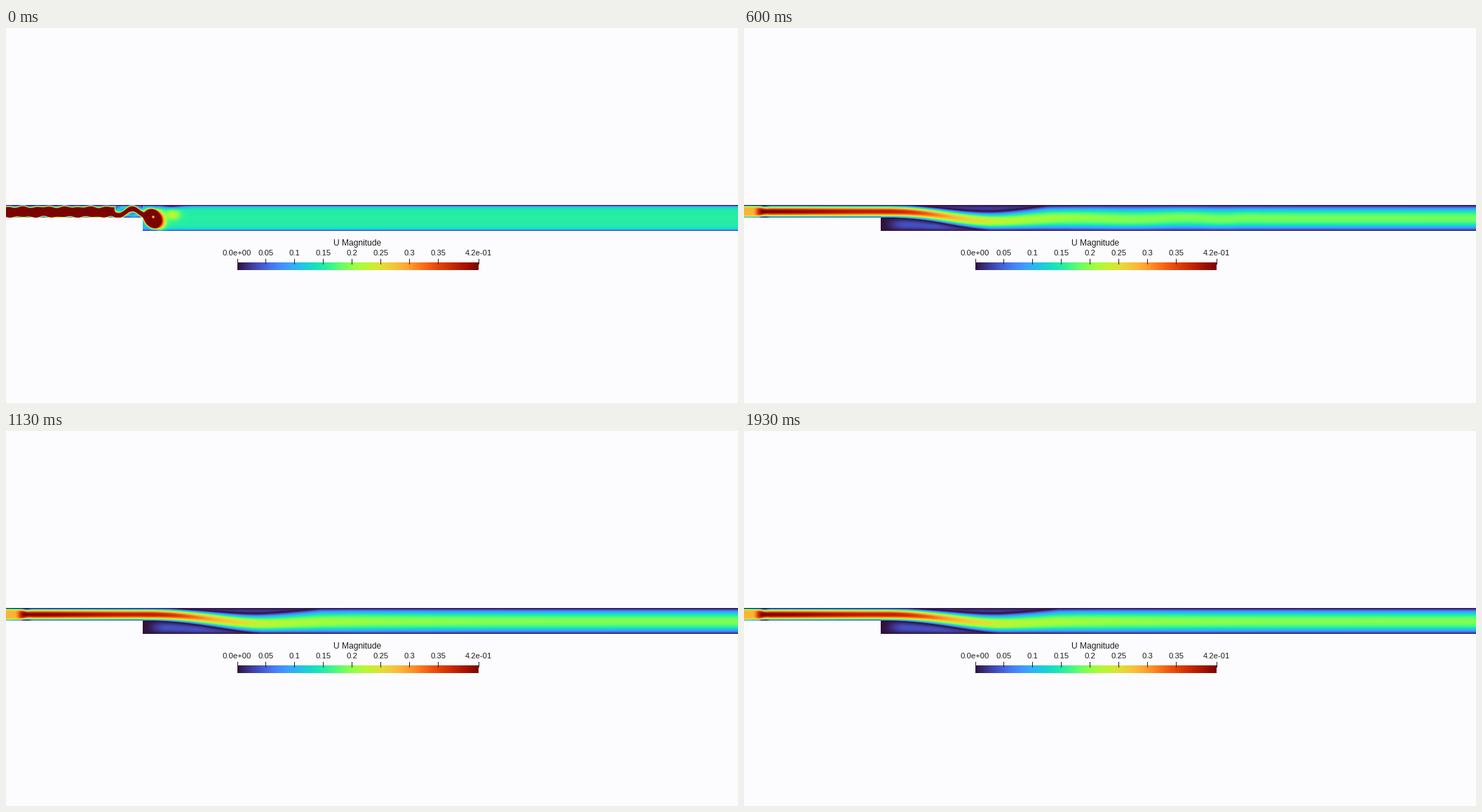
These frames come from a looping animation (1044x536 px, 2000 ms). A matplotlib script:

```python
import numpy as np
import matplotlib.pyplot as plt
from matplotlib.animation import FuncAnimation

W, H = 1044, 536
TOP, BOTTOM, STEP_X, STEP_Y = 253.6, 289.9, 195, 271
STEPS, TICK_MS, LOOP_MS = 30, 10, 2000
UMAX = 0.42

x = np.arange(W) + 0.5
X = x[None, :]
Y = (np.arange(253, 290) + 0.5)[:, None]


def ramp(v, a, b):
    t = np.clip((v - a) / (b - a), 0, 1)
    return t * t * (3 - 2 * t)


def bump(v, mid, width):
    return np.exp(-((v - mid) / width) ** 2)


def paint(v, dist, soft):
    """Saturate the field where dist is negative, with a soft rim."""
    return v + (0.5 - v) / (1 + np.exp(np.clip(dist / soft, -50, 50)))


def centreline(k, front):
    """Settled dip behind the step plus a wave train that drifts off and decays."""
    settled = 262.3 + 9.7 * ramp(x, 205, 370) + 3.2 * bump(x, 370, 75)
    s = front - x
    phase = np.pi * np.log1p(np.maximum(s, 0) / 100) / 0.28
    amp = 11.5 / (1 + (k / 6.2) ** 5) * ramp(s, -10, 110) * ramp(x, 215, 310)
    return np.clip(settled + amp * np.cos(phase), 262, 281)


def flow(k):
    """Speed field once the inlet jet has formed."""
    front = 242 + 57.5 * k
    past = np.maximum(x - STEP_X, 0)

    inlet = 0.285 + 0.135 * ramp(x, 12, 27) - 0.035 * ramp(x, 30, STEP_X)
    far = 0.192 - 0.042 * np.exp(-k / 5)
    peak = far + (inlet - far) / (1 + (past / 105) ** 2.4)
    peak += 0.25 * np.exp(-k / 1.2) * bump(x, front - 35, 35)

    half = 8.9 + 12 * (past / 275) ** 1.5 - bump(x, 29, 7)
    half += 30 * ramp(x, front - 30, front + 10)
    plug = 2 + 14 * np.exp(-k / 1.6) * ramp(x, front - 60, front)
    plug += 5 * (1 - ramp(x, 2, 34))
    shear = 1 + 0.4 * ramp(x, 195, 270) * (1 - ramp(x, 340, 520))

    mid = centreline(k, front)
    floor = np.where(x < STEP_X, STEP_Y, BOTTOM)
    up = np.minimum(half, mid - TOP)
    down = np.minimum(half, floor - mid)
    eta = np.abs(Y - mid) / np.where(Y < mid, up, down)
    jet = peak * (1 - np.minimum(eta, 1) ** plug) ** shear

    # Slow backflow in the pockets between jet and wall
    low, high = mid + down, mid - up
    gap_low, gap_high = floor - low, high - TOP
    s_low = np.clip((Y - low) / np.maximum(gap_low, 0.1), 0, 1)
    s_high = np.clip((high - Y) / np.maximum(gap_high, 0.1), 0, 1)
    back = 0.038 * np.clip(gap_low / 12, 0, 1) * ramp(x, 195, 230) * np.sin(np.pi * s_low)
    back += 0.03 * np.clip(gap_high / 10, 0, 1) * np.sin(np.pi * s_high)
    return jet + back


def start_up():
    """Speed field at the first instant: saturated eddies in the inlet."""
    floor = np.where(X < STEP_X, STEP_Y, BOTTOM)
    wall = np.clip(np.minimum(Y - TOP, floor - Y), 0, None)
    v = 0.151 + 0.08 * bump(X, 238, 10) * bump(Y, 267, 7)
    v = v * (1 - 0.95 * bump(X, 236, 17) * bump(Y, 253.5, 3.5))
    v = np.where((X < 205) & (Y > STEP_Y), 0.11, v)
    v = np.where(X < STEP_X, 0.12 + 0.07 * np.sin(X / 4.3) * np.sin(Y / 2 + X / 9), v)
    v *= 1 - np.exp(-wall / 1.8)

    # Scalloped slug, its wavy tail and the rolled-up head
    slug = np.abs(Y - 263 - 0.7 * np.sin(X / 5)) - 7.2 - 0.8 * np.sin(X / 3.1)
    v = paint(v, np.maximum(slug, X - 155), 0.6)
    tail = 0.8 * np.abs(Y - 263.3 - 4.9 * np.cos(np.pi * (X - 160) / 20)) - 3.2
    v = paint(v, np.maximum(tail, np.abs(X - 175) - 27), 0.6)
    along = (X - 210 + Y - 272.5) / np.sqrt(2)
    across = (X - 210 - Y + 272.5) / np.sqrt(2)
    head = 13 * (np.hypot(along / 15.5, across / 12.5) - 1)
    v = paint(v, head, 0.7 + 1.5 * ramp(X, 212, 224))
    return v - 0.32 * bump(np.hypot(X - 210, Y - 270), 0, 2)


def field(k):
    v = flow(k) if k else start_up()
    return np.where((X < STEP_X) & (Y > STEP_Y), np.nan, v)


fields = [field(k) for k in range(STEPS)]

fig = plt.figure(figsize=(W / 100, H / 100), dpi=100, facecolor="#fcfcfe")
ax = fig.add_axes([0, 0, 1, 1])
ax.axis("off")

look = dict(cmap="turbo", vmin=0, vmax=UMAX, aspect="auto", interpolation="nearest")
duct = ax.imshow(fields[0], extent=(0, W, 290, 253), **look)
ax.imshow(np.linspace(0, UMAX, 256)[None, :], extent=(330, 674, 346, 335), **look)
ax.set_xlim(0, W)
ax.set_ylim(H, 0)


def label(cx, cy, text, px):
    ax.text(cx, cy, text, fontsize=px * 0.72, family="Liberation Sans",
            color="#1c1c1c", ha="center", va="baseline")


label(501, 311, "U Magnitude", 12)
for value in [*np.arange(8) * 0.05, UMAX]:
    tx = 329.5 + 344 * value / UMAX
    text = f"{value:.1e}" if value in (0, UMAX) else f"{value:.2g}"
    label(tx, 325, text, 11.3)
    ax.plot([tx, tx], [330, 337], color="#222222", lw=0.72)


def update(i):
    k = int((i * TICK_MS + 3.4) * STEPS / LOOP_MS)
    duct.set_data(fields[min(k, STEPS - 1)])
    return [duct]


anim = FuncAnimation(fig, update, frames=LOOP_MS // TICK_MS, interval=TICK_MS,
                     repeat=True, repeat_delay=0, blit=False)
plt.show()
```
